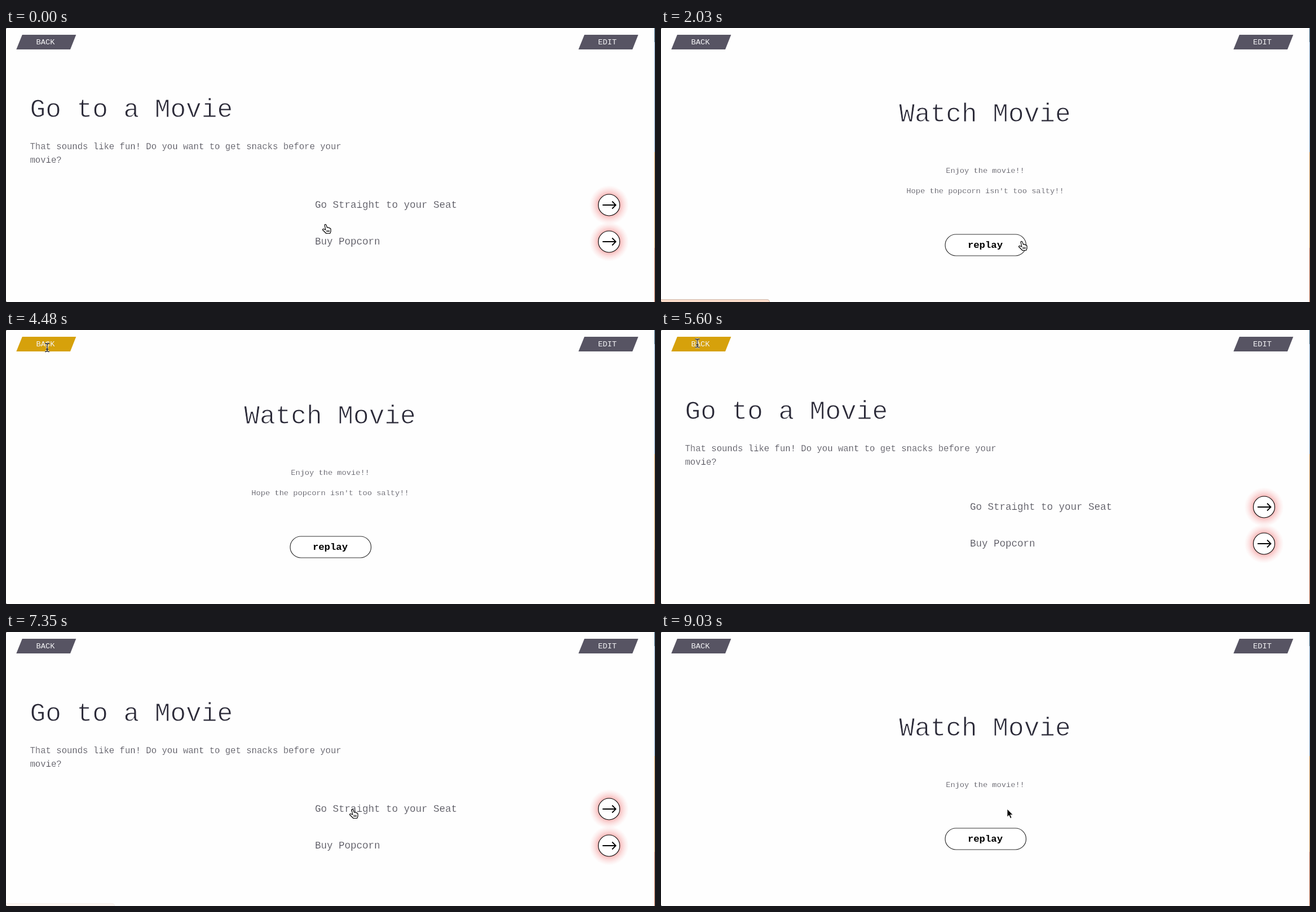
These frames come from a looping animation (1151 by 486 pixels, 9.1 s). An HTML page:

```html
<!DOCTYPE html>
<html lang="en">
<head>
<meta charset="utf-8">
<title>Go to a Movie</title>
<style>
html, body { margin: 0; width: 100%; height: 100%; overflow: hidden; background: #fefefe; }
svg { display: block; width: 1151px; height: 486px; }
text { font-family: "Courier New", "Liberation Mono", monospace; fill: #4c4b55; white-space: pre; }
.mid { text-anchor: middle; }
/* Pale outlines slim the strokes of the text. */
.title { font-size: 46.1px; fill: #2b2a38; stroke: #fefefe; stroke-width: 1; }
.body, .option, .note { stroke: #fefefe; stroke-width: .25; }
.body { font-size: 15.6px; }
.option { font-size: 17.5px; }
.note { font-size: 13.7px; }
.replay { font-size: 17.3px; font-weight: bold; fill: #000; }
.tab { fill: #575463; }
.label { font-size: 13.7px; fill: #f4f4f6; }
.line { fill: none; stroke: #000; stroke-width: 1.8; }

.cut { opacity: 0; animation: 9.1s step-end infinite; }
#choose { animation-name: choose; }
#salty { animation-name: salty; }
#plain { animation-name: plain; }
#hand { animation-name: hand; }
#arrow { animation-name: arrow; }
#beam { animation-name: beam; }
#status { animation: status 9.1s linear infinite; }
#back { animation: back 9.1s linear infinite; }
#pointer { animation: travel 9.1s ease-in-out infinite; }

/* Pages */
@keyframes choose { 0%, 58.44% { opacity: 1 } 21.52%, 83.83%, 100% { opacity: 0 } }
@keyframes salty { 0%, 58.44%, 100% { opacity: 0 } 21.52% { opacity: 1 } }
@keyframes plain { 0% { opacity: 0 } 83.83%, 100% { opacity: 1 } }

/* Link preview and hover colour */
@keyframes status {
  0%, 6.3% { opacity: 0 } 7.69%, 25.4% { opacity: 1 } 28.46%, 80.3% { opacity: 0 }
  82.31%, 89% { opacity: 1 } 92.31%, 100% { opacity: 0 }
}
@keyframes back {
  0%, 43.6% { fill: #575463 } 45.38%, 62.2% { fill: #d6a10b } 64.4%, 100% { fill: #575463 }
}

/* Pointer shapes and path */
@keyframes hand {
  0%, 44.6%, 76.9% { opacity: 1 } 33.8%, 49.2%, 86.1%, 100% { opacity: 0 }
}
@keyframes arrow {
  0%, 44.6%, 69.2%, 76.9% { opacity: 0 } 33.8%, 62.2%, 73%, 86.1%, 100% { opacity: 1 }
}
@keyframes beam {
  0%, 62.2%, 73%, 100% { opacity: 0 } 49.2%, 69.2% { opacity: 1 }
}
@keyframes travel {
  0% { transform: translate(566px, 348px) }
  4.62%, 25.4% { transform: translate(639px, 378px) }
  30.77%, 32.31% { transform: translate(576px, 380px) }
  42.31% { transform: translate(178px, 100px); animation-timing-function: ease-out }
  45.38%, 47.7% { transform: translate(78px, 34px) }
  49.2%, 55.4% { transform: translate(73px, 31px) }
  56.92%, 60.9% { transform: translate(62px, 22px) }
  71.5%, 72.2% { transform: translate(393px, 206px) }
  78.46%, 100% { transform: translate(614px, 314px) }
}
</style>
</head>
<body>
<svg viewBox="0 0 1151 486">
  <defs>
    <radialGradient id="glow">
      <stop offset=".5" stop-color="#f37c7c" stop-opacity=".62"/>
      <stop offset=".68" stop-color="#f58f8f" stop-opacity=".36"/>
      <stop offset=".85" stop-color="#f7a0a0" stop-opacity=".16"/>
      <stop offset="1" stop-color="#f9b0b0" stop-opacity="0"/>
    </radialGradient>
    <g id="go">
      <circle r="35" fill="url(#glow)"/>
      <circle r="19" fill="#fff" stroke="#000" stroke-width="1.1"/>
      <path class="line" d="M-11.5 0H12M5.5-6.5L12 0L5.5 6.5"/>
    </g>
    <path id="slant" d="M28.8 12H124.3L114 38H18.3Z"/>
    <g id="button">
      <rect x="504" y="366" width="143.5" height="38" rx="19" fill="#fff" stroke="#333" stroke-width="1.2"/>
      <text class="replay mid" x="575" y="390">replay</text>
    </g>
  </defs>

  <rect width="1151" height="486" fill="#fefefe"/>

  <g id="choose" class="cut">
    <text class="title" x="42.5" y="157.5">Go to a Movie</text>
    <text class="body" x="42.5" y="215">That sounds like fun! Do you want to get snacks before your</text>
    <text class="body" x="42.5" y="239">movie?</text>
    <text class="option" x="548" y="319">Go Straight to your Seat</text>
    <text class="option" x="548" y="384">Buy Popcorn</text>
    <use href="#go" x="1069.5" y="314"/>
    <use href="#go" x="1069.5" y="379"/>
  </g>

  <g id="salty" class="cut">
    <text class="title mid" x="574.5" y="165.5">Watch Movie</text>
    <text class="note mid" x="575" y="257">Enjoy the movie!!</text>
    <text class="note mid" x="575" y="293">Hope the popcorn isn't too salty!!</text>
    <use href="#button"/>
  </g>

  <g id="plain" class="cut">
    <text class="title mid" x="574.5" y="183.5">Watch Movie</text>
    <text class="note mid" x="575" y="275">Enjoy the movie!!</text>
    <use href="#button" y="-18"/>
  </g>

  <g id="back" fill="#575463"><use href="#slant"/></g>
  <use class="tab" href="#slant" x="997"/>
  <text class="label mid" x="70" y="29">BACK</text>
  <text class="label mid" x="1066.5" y="29">EDIT</text>

  <path id="status" d="M-2 481.5H188Q192.5 481.5 192.5 486V490H-2Z" fill="#fbdcca" stroke="#cfbcb1"/>

  <!-- Desktop showing past the window edge -->
  <g>
    <rect x="1150" width="1" height="25" fill="#24506f"/>
    <rect x="1150" y="25" width="1" height="195" fill="#7a9cc0"/>
    <rect x="1150" y="220" width="1" height="170" fill="#c08a4c"/>
    <rect x="1150" y="390" width="1" height="96" fill="#a95a3c"/>
    <path d="M0 0h1v1H0ZM0 485h1v1H0Z" fill="#555"/>
  </g>

  <g id="pointer">
    <g id="hand" class="cut" stroke="#000" stroke-linejoin="round">
      <path fill="#fff" stroke-width="1.2" d="M-1 1.5Q-.5 0 1 .5Q2 1 2.5 3L3.5 6Q5 5 6 6.5Q7.5 5.8 8 7.2Q9.8 6.8 10 9V13L8.5 16.5H2L-1.5 13L-4.5 10Q-4.5 8-2.5 8.5L.8 10Z"/>
      <path fill="none" d="M3 10.5V14M5 10.5V14M7 10.5V14"/>
    </g>
    <path id="arrow" class="cut" d="M0 0V14L3.2 11L5.6 16.5L8 15.4L5.6 10.2H10Z" stroke="#fff" stroke-width=".8"/>
    <g id="beam" class="cut" fill="none">
      <path d="M-4-7.5Q0-7.5 0-5Q0-7.5 4-7.5M0-5V5M-4 7.5Q0 7.5 0 5Q0 7.5 4 7.5M-2 3H2" stroke="#fff" stroke-width="3"/>
      <path d="M-4-7.5Q0-7.5 0-5Q0-7.5 4-7.5M0-5V5M-4 7.5Q0 7.5 0 5Q0 7.5 4 7.5M-2 3H2" stroke="#111" stroke-width="1.3"/>
    </g>
  </g>
</svg>
</body>
</html>
```
